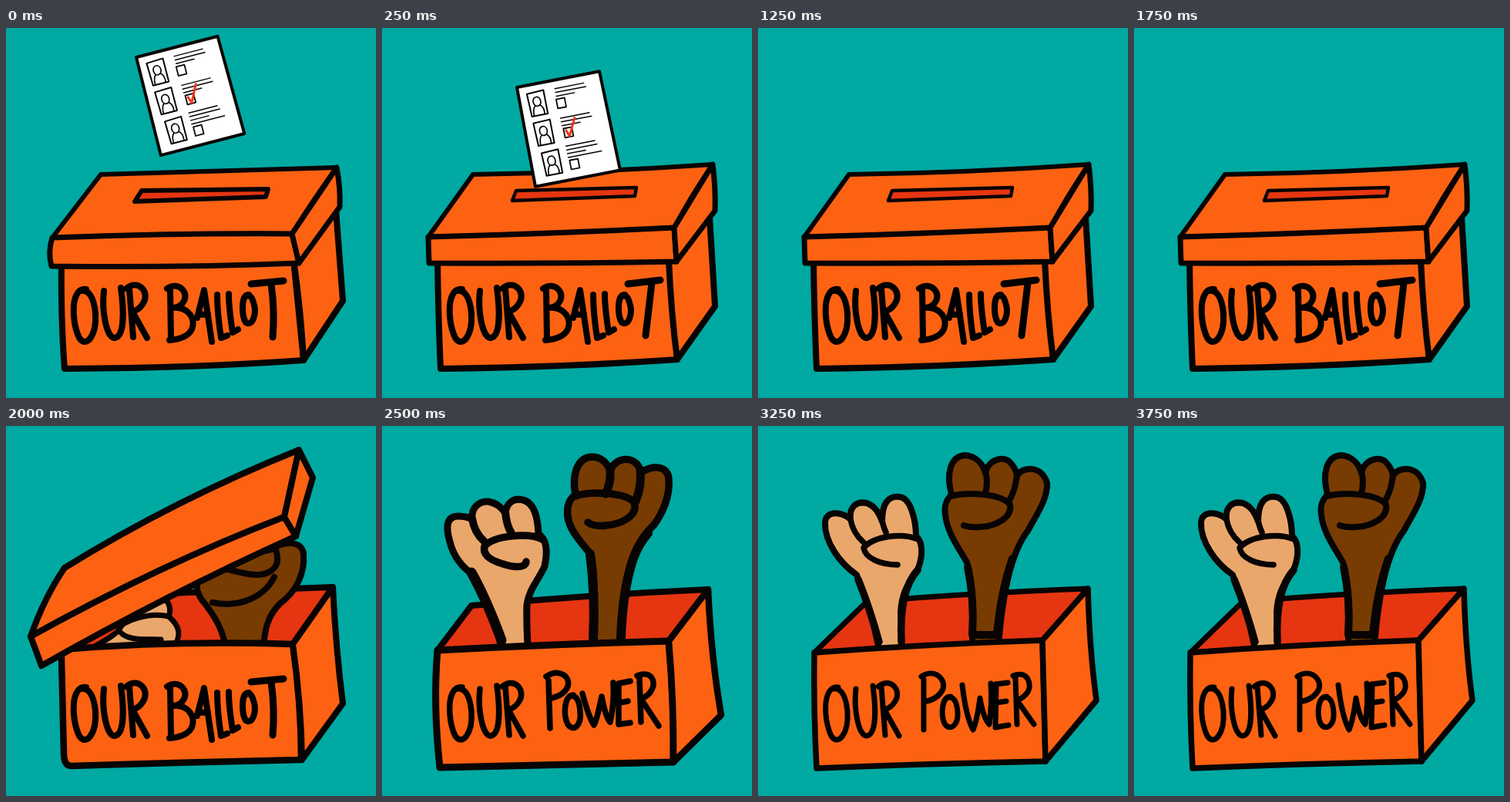
Animation, 480 px wide and 480 px high, one loop 4 s. Source, as an HTML page:

```html
<!DOCTYPE html>
<html lang="en">
<head>
<meta charset="utf-8">
<title>Our ballot, our power</title>
<style>
html, body { margin: 0; width: 100%; height: 100%; overflow: hidden; background: #00a9a2; }
svg { display: block; width: 100vw; height: 100vh; }
</style>
</head>
<body>
<svg id="stage" viewBox="0 0 480 480" role="img" aria-label="Our ballot, our power" stroke-linecap="round" stroke-linejoin="round"></svg>
<script>
const STEP = 250, STEPS = 16;
const TEAL = '#00a9a2', ORANGE = '#fd6212', RED = '#e63511', BROWN = '#783c02', TAN = '#eaa76c', INK = '#080404';

const path = (d, width, fill = 'none', ink = INK) =>
  `<path d="${d}" stroke="${ink}" stroke-width="${width}" fill="${fill}"/>`;
const group = (body, transform = '') => `<g transform="${transform}">${body}</g>`;
const letters = (d, width) => path(d, width, 'none', '#000');

// Lettering
const OUR = 'M104 339C84 336 84 379 95 402C104 416 118 399 116 370C114 350 108 339 97 341' +
  'M127 341C124 366 130 402 141 402C154 400 153 366 149 337' +
  'M160 338L165 401M156 338C172 325 187 343 178 357C174 364 168 367 164 368L183 402';
const BALL = 'M213 339L214 403M209 338C224 328 237 343 231 354C227 362 220 363 216 363C236 361 247 377 241 391C236 401 224 404 212 405' +
  'M248 376L257 340L267 407M250 372L262 371' +
  'M274 346C274 367 277 389 279 402L287 399M289 345C289 363 292 382 294 395L301 391' +
  'M315 346C304 346 306 374 311 382C320 388 326 370 321 356C319 349 317 347 313 347';
const POWER_P = 'M216 330L218 392M213 325C230 314 245 325 241 338C237 347 229 351 220 353' +
  'M248 349C236 350 235 375 241 387C249 398 259 388 257 370C256 356 252 349 245 350' +
  'M260 347C264 362 269 379 275 388C280 378 282 363 285 351C288 367 291 379 296 384C300 366 301 349 300 333' +
  'M307 334L307 387M307 334L322 331M308 359L319 357M307 387L322 385' +
  'M334 327L336 384M331 324C350 316 356 333 350 342C347 349 341 352 336 354L359 389';
const POWER_Q = 'M215 329L215 394M212 325C229 314 244 328 240 341C236 350 228 355 219 357' +
  'M250 351C238 351 237 375 242 386C249 397 260 388 259 372C258 357 254 351 247 352' +
  'M265 336C268 362 273 383 279 394C285 380 286 366 288 353C291 371 295 382 300 387C303 367 303 350 302 334' +
  'M309 335L308 391M308 335L324 333M309 359L322 357M308 391L325 388' +
  'M334 327L336 387M331 324C350 316 356 336 350 345C346 351 341 354 336 356L358 387';
const ballotText = tee => letters(OUR + BALL, 8) + letters(tee, 9);

// Closed box, two line drawings
const closedA =
  path('M72 300Q71 378 76 442Q250 441 386 431L373 300Z', 8, ORANGE) +
  path('M373 300Q383 370 386 431L437 354L428 236Z', 8, ORANGE) +
  path('M60 272L123 190Q280 186 429 181Q399 222 371 267Q220 266 60 272Z', 6, ORANGE) +
  path('M60 272Q54 291 59 309Q230 311 380 305L371 267Q220 266 60 272Z', 7, ORANGE) +
  path('M371 267L429 181Q434 208 433 232L380 305Z', 7, ORANGE) +
  path('M176 211L340 209L337 219L167 225Z', 6, RED) +
  ballotText('M318 332L360 328M344 332Q349 368 346 401');
const closedB =
  path('M72 300Q73 378 76 442Q240 440 383 430L372 300Z', 8, ORANGE) +
  path('M372 300Q375 370 383 430L432 361L425 246Z', 8, ORANGE) +
  path('M60 271L118 190Q270 188 429 177Q402 216 379 259Q220 267 60 271Z', 6, ORANGE) +
  path('M60 271L61 305Q230 306 382 303L379 259Q220 267 60 271Z', 7, ORANGE) +
  path('M379 259L429 177Q433 208 432 237L382 303Z', 7, ORANGE) +
  path('M174 211L330 207L328 218L169 224Z', 4.5, RED) +
  ballotText('M319 332L361 327M350 331Q346 366 342 399');

// Ballot paper in its own upright coordinates
const photo = (x, y) => group(
  path('M0 1L22 0L22 31L1 31Z', 2) +
  path('M11 7C4 7 5 19 11 19C18 19 17 7 11 7M8 18Q4 21 4 30M14 18Q19 22 18 30', 1.7),
  `translate(${x} ${y})`);
const rules = (y, n) => {
  let d = '';
  for (let i = 0; i < n; i++) d += `M48 ${y + i * 5}l${i === 2 ? 24 : 38 + i * 2} 0`;
  return path(d, 1.5);
};
const tickBox = (x, y) => path(`M${x} ${y}l11 0l0 12l-11 0Z`, 1.8);
const paper =
  path('M0 0L109 0L111 131L-1 131Z', 4, '#fff') +
  photo(11, 10) + photo(12, 49) + photo(15, 89) +
  rules(11, 3) + rules(50, 3) + rules(87, 4) +
  tickBox(47, 25) + tickBox(49, 64) + tickBox(49, 106) +
  path('M52 67L55 75L66 53', 3, 'none', '#ee3a1c');
const ballot = (x, y, turn) =>
  `<g clip-path="url(#slot)">${group(paper, `translate(${x} ${y}) rotate(${turn})`)}</g>`;

// Fists
const lightFistP =
  path('M158 310C153 262 137 226 120 194C106 185 93 171 88 150C82 130 84 117 99 117C108 117 113 118 117 122C115 106 126 97 138 98C149 100 155 105 160 113C162 98 172 93 183 96C196 99 202 116 203 140C214 147 215 163 211 182C203 200 191 211 188 232C187 255 189 280 190 310', 9, TAN) +
  path('M117 120C119 134 125 143 133 150M160 111C161 124 164 133 168 139', 10) +
  path('M208 147C190 138 145 142 133 156C130 168 143 175 157 179C172 184 186 184 187 176', 9.5) +
  path('M116 190Q136 226 155 278', 13);
const darkFistP =
  path('M274 310C276 230 276 190 271 167C259 151 244 137 241 118C239 102 244 94 251 89C246 64 253 41 272 40C286 40 293 50 296 58C303 41 323 39 332 51L337 60C345 53 370 48 372 68C374 91 364 113 353 128C335 145 325 165 317 205C311 230 310 255 310 310', 9.5, BROWN) +
  path('M296 58C297 70 294 80 290 88M335 58C337 76 333 88 329 98', 11) +
  path('M251 91C269 84 316 86 327 99C333 115 313 127 291 129Q275 131 267 125', 9.5) +
  path('M270 166Q277 222 274 275M345 139C327 159 321 185 316 212Q311 242 310 275', 12);
const lightFistQ =
  path('M160 310C154 262 140 226 128 193C106 178 86 150 87 125C88 109 109 111 120 121C118 106 127 97 141 100C152 104 157 113 161 124C161 100 169 90 184 92C199 94 205 125 205 143C214 150 214 168 208 184C200 201 187 208 185 242Q186 280 188 310', 8, TAN) +
  path('M120 121C122 133 128 143 137 151M160 113Q161 128 166 138M208 147C186 138 150 143 137 158C139 171 158 180 181 180', 7.5) +
  path('M130 199Q145 236 157 280M207 187Q183 213 186 280', 9.5);
const darkFistQ =
  path('M277 310C280 235 279 200 271 177C261 159 245 138 243 115C241 102 245 95 251 89C244 62 249 40 268 38C284 39 292 50 295 61C298 45 316 38 326 46C332 52 335 58 336 64C343 53 368 50 375 74C376 94 362 114 350 136C329 163 316 215 310 310', 8, BROWN) +
  path('M295 59C298 70 297 80 295 87M336 62C335 79 330 90 325 99M250 91C274 85 316 88 327 102C330 118 310 130 288 131Q275 132 267 129', 8) +
  path('M272 183Q281 225 278 271L310 271Q315 215 330 172', 10);

// Open box: inside and fists go behind the front faces
const openP = body =>
  path('M72 291L116 233Q270 219 423 212L372 279Z', 8, RED) + body +
  path('M72 291Q220 283 372 279Q379 360 378 436Q220 439 75 443Q66 360 72 291Z', 9, ORANGE) +
  path('M372 279L423 212Q427 300 440 375L378 436Q379 360 372 279Z', 8.5, ORANGE) +
  letters(OUR + POWER_P, 7.5);
const openQ = body =>
  path('M73 294L141 228Q270 217 428 211L369 278Z', 7, RED) + body +
  path('M73 294Q220 283 369 278L373 435Q220 438 76 444Q72 370 73 294Z', 7.5, ORANGE) +
  path('M369 278L428 211Q430 290 439 356L373 435Z', 7.5, ORANGE) +
  letters(OUR + POWER_Q, 7);

const lid =
  path('M32 273Q50 222 76 184Q220 95 380 31L361 118Q200 180 32 273Z', 8, ORANGE) +
  path('M32 273L46 311Q210 218 376 143L361 118Q200 180 32 273Z', 8, ORANGE) +
  path('M361 118L380 31L398 67L376 143Z', 8, ORANGE);

const lifting =
  path('M72 290L130 220L424 209L372 283Z', 8, RED) +
  path('M104 292C122 282 145 270 148 262L168 230L207 225C213 232 214 240 211 247C226 260 228 272 217 288Z', 7, TAN) +
  path('M211 247C188 241 150 252 146 264C154 280 182 276 201 277', 7) +
  path('M286 300C285 265 268 243 253 224C246 212 247 205 250 199L300 170L345 160C360 149 384 148 386 166C388 192 376 215 356 230C340 245 335 262 333 300Z', 8, BROWN) +
  path('M284 185C303 190 328 197 340 190C353 184 354 174 350 160M268 229C302 236 334 223 348 196', 8) +
  path('M72 300L72 290Q220 278 372 283Q383 360 383 433Q240 436 84 441Q75 440 75 425Z', 8.5, ORANGE) +
  path('M372 283L424 209Q428 290 437 360L384 433Q383 360 372 283Z', 8, ORANGE) +
  ballotText('M318 332L360 328M344 332Q349 368 346 401') + lid;

const popping = openQ(group(lightFistQ + darkFistQ, 'translate(0 28)')) + group(lid, 'translate(-190 -95)');
const powerP = openP(lightFistP + darkFistP);
const powerQ = openQ(lightFistQ + darkFistQ);

const drops = [[169, 38, -14.5], [175, 77, -11], [182, 108, -8], [190, 187, -5]];
function scene(step) {
  const even = step % 2 === 0;
  if (step < 8) return (even ? closedA : closedB) + (drops[step] ? ballot(...drops[step]) : '');
  if (step === 8) return lifting;
  if (step === 9) return popping;
  return even ? powerP : powerQ;
}

const stage = document.getElementById('stage');
const base = `<defs><clipPath id="slot"><path d="M0 0H480V216L328 219L169 224L0 229Z"/></clipPath></defs>` +
  `<rect width="480" height="480" fill="${TEAL}"/>`;
const start = performance.now();
let shown = -1;

function draw() {
  const step = Math.floor((performance.now() - start) / STEP) % STEPS;
  if (step !== shown) {
    stage.innerHTML = base + scene(step);
    shown = step;
  }
  requestAnimationFrame(draw);
}
draw();
</script>
</body>
</html>
```
